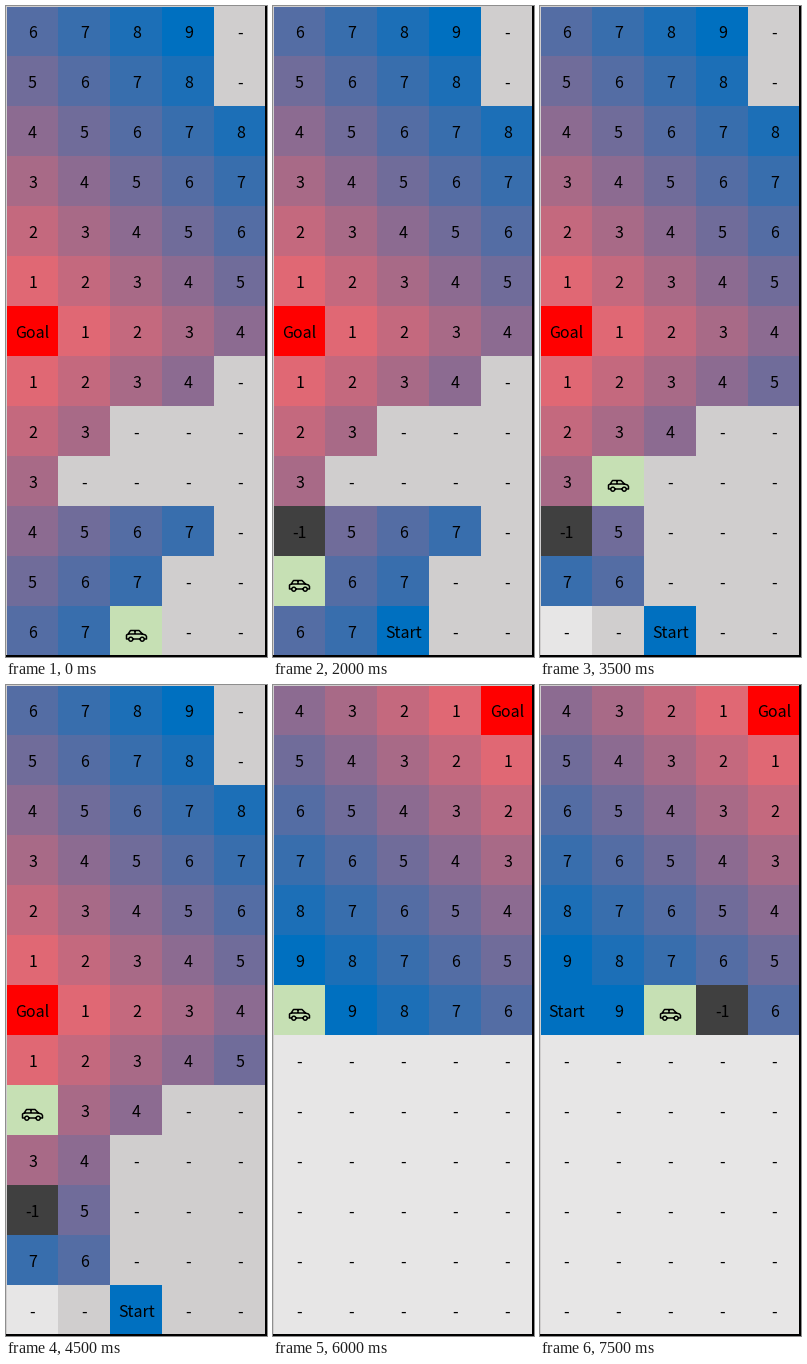
Write a matplotlib script that moves like this. It is 261 px wide and 651 px high and loops after 8000 ms.

```python
import matplotlib.pyplot as plt
from matplotlib.animation import FuncAnimation
from matplotlib.patches import PathPatch, Rectangle
from matplotlib.path import Path
from matplotlib.transforms import Affine2D

W, H, DPI = 261, 651, 64
PX = 72 / DPI  # points per pixel
ROWS, COLS = 13, 5
XS = [1, 52, 104, 156, 208, 259]
YS = [1] + [50 * r for r in range(1, ROWS)] + [649]

# G goal, S start, # blocked, - unknown, . unvisited
OPEN = ["6789-", "5678-", "45678", "34567", "23456", "12345", "G1234"]
FIRST = OPEN + ["1234-", "23---", "3----", "4567-", "567--", "67S--"]
REPLAN = OPEN + ["12345", "234--", "34---", "#5---", "76---", ".-S--"]
SECOND = (["4321G"]
          + ["".join(str(r + 4 - c) for c in range(COLS)) for r in range(1, 6)]
          + ["S9876"] + ["....."] * 6)

LABELS = {"G": "Goal", "S": "Start", "#": "-1", ".": "-"}
FILLS = {"G": "#ff0000", "S": "#0070c0", "#": "#404040",
         "-": "#d0cece", ".": "#e7e6e6"}
CAR_FILL = "#c6e0b4"


def block(grid, row, col):
    line = grid[row]
    return grid[:row] + [line[:col] + "#" + line[col + 1:]] + grid[row + 1:]


STEPS = (
    [(FIRST, p) for p in [(12, 2), (12, 1), (12, 0), (11, 0)]]
    + [(block(FIRST, 10, 0), (11, 0))]
    + [(REPLAN, p) for p in [(11, 1), (10, 1), (9, 1), (9, 0),
                             (8, 0), (7, 0), (6, 0)]]
    + [(SECOND, p) for p in [(6, 0), (6, 1), (6, 2)]]
    + [(block(SECOND, 6, 3), (6, 2))]
)


def fill(key):
    if key in FILLS:
        return FILLS[key]
    v = int(key)
    return ((252 - 28 * v) / 255, (103 + v) / 255, (106.5 + 9.5 * v) / 255)


def car_path():
    body = Path([(-8, 5), (-10, 5), (-10, 1), (-8.3, 0), (-6, -3.5), (2.5, -3.5),
                 (6, 0), (9, 1), (10, 2.5), (10, 5), (8, 5)])
    belt = Path([(-8.3, 0), (6, 0)])
    pillar = Path([(-1.5, -3.5), (-1.5, 0)])
    sill = Path([(-3.5, 5), (3.5, 5)])
    wheels = [Path.circle((x, 5.2), 2) for x in (-5.7, 5.7)]
    return Path.make_compound_path(body, belt, pillar, sill, *wheels)


fig = plt.figure(figsize=(W / DPI, H / DPI), dpi=DPI, facecolor="black")
ax = fig.add_axes([0, 0, 1, 1])
ax.set_xlim(0, W)
ax.set_ylim(H, 0)
ax.axis("off")


def box(x0, y0, x1, y1, color):
    return ax.add_patch(Rectangle((x0, y0), x1 - x0, y1 - y0, facecolor=color,
                                  linewidth=0, antialiased=False))


box(0, 0, 259, 1, "#d0cece")
box(0, 0, 1, 649, "#d0cece")

cells, labels = {}, {}
for r in range(ROWS):
    for c in range(COLS):
        cells[r, c] = box(XS[c], YS[r], XS[c + 1], YS[r + 1], "white")
        labels[r, c] = ax.text(26.5 + 52 * c, 50 * r + 32, "", ha="center",
                               va="baseline", color="black", fontsize=16 * PX,
                               family="Noto Sans CJK JP")

car = ax.add_patch(PathPatch(car_path(), facecolor="none", edgecolor="black",
                             linewidth=1.5 * PX, joinstyle="round"))


def draw(i):
    grid, pos = STEPS[i]
    for (r, c), cell in cells.items():
        key = grid[r][c]
        here = (r, c) == pos
        cell.set_facecolor(CAR_FILL if here else fill(key))
        labels[r, c].set_text("" if here else LABELS.get(key, key))
    row, col = pos
    shift = Affine2D().translate(26.5 + 52 * col, 50 * row + 28)
    car.set_transform(shift + ax.transData)
    return [*cells.values(), *labels.values(), car]


anim = FuncAnimation(fig, draw, frames=len(STEPS), interval=500,
                     repeat=True, repeat_delay=0)
plt.show()
```
